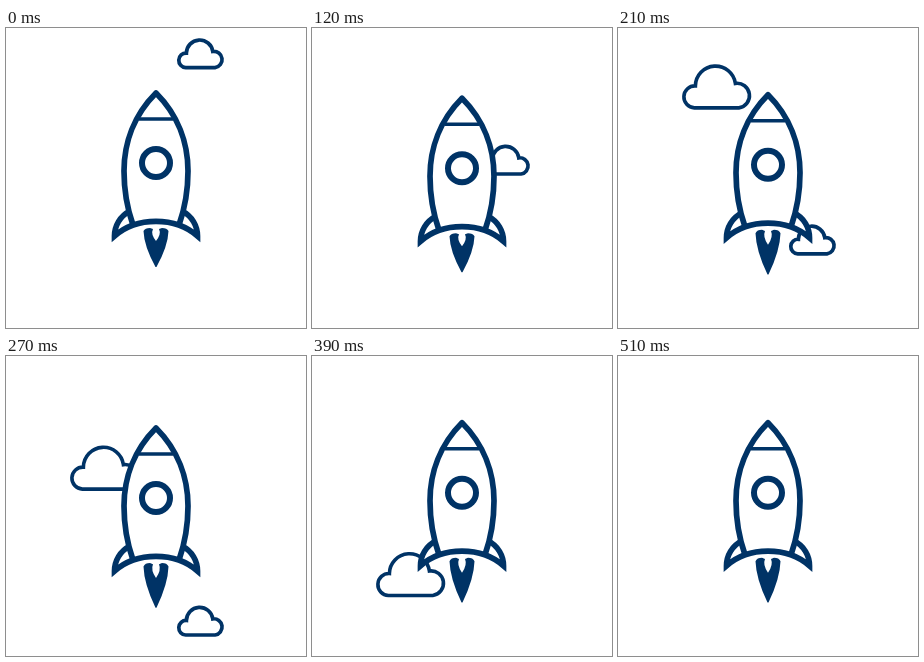
An HTML page that plays this animation: 300x300 px, repeating every 0.54 s.

```html
<!DOCTYPE html>
<html lang="en">
<head>
<meta charset="utf-8">
<title>Rocket</title>
<style>
  html, body { margin: 0; width: 100%; height: 100%; overflow: hidden; background: #fff; }
  svg { display: block; width: 100vw; height: 100vh; }
</style>
</head>
<body>
<svg viewBox="0 0 300 300" fill="#fff" stroke="#036">
  <defs>
    <path id="cloud" d="M10.8 0A10.8 10.8 0 0 1 11.8 -22A20.1 20.1 0 0 1 51.8 -24.500A12.2 12.2 0 0 1 55.2 0Z"/>
    <path id="hull" d="M127 197C121 180 118 163 118 143C118 115 128 87 150 65C172 87 182 115 182 143C182 163 179 180 173 197"/>
  </defs>
  <g id="small"><use href="#cloud" transform="scale(.66)" stroke-width="5.600"/></g>
  <g id="large"><use href="#cloud" stroke-width="3.600"/></g>
  <g id="rocket" stroke-width="5.700">
    <path id="flame" fill="#036" stroke="none" d="M137.500 3Q139 0 144 0L147 1Q144.500 6 150 13Q155.500 6 153 1L156 0Q161 0 162.500 3Q162 18 150.500 39H149.500Q138 18 137.500 3Z"/>
    <use href="#hull" stroke="none"/>
    <path d="M124 183C114 188 108.500 198 108.500 208Q125 193.300 150 193.300T191.500 208C191.500 198 186 188 176 183"/>
    <use href="#hull" fill="none" stroke-linejoin="round"/>
    <path d="M133 91H167" stroke-width="3.600"/>
    <circle cx="150" cy="135" r="14" stroke-width="6"/>
  </g>
</svg>
<script>
  const STEP = 30, STEPS = 18, FALL = 26.6;
  const [small, large, rocket, flame] =
    ['small', 'large', 'rocket', 'flame'].map(id => document.getElementById(id));

  const move = (el, x, y) => el.setAttribute('transform', `translate(${x} ${y})`);

  function drop(el, x, y, step, first, last) {
    el.style.display = step >= first && step <= last ? '' : 'none';
    move(el, x, y + FALL * (step - first));
  }

  function draw(ms) {
    const step = Math.floor(ms / STEP) % STEPS;
    drop(small, 172.6, 39.6, step, 0, 9);
    drop(large, 65.6, 53.3, step, 6, 14);
    move(rocket, 0, 3.5 * (1 - Math.cos(step * Math.PI / 3)));

    // The flame stretches and shrinks every four steps
    const grow = 2 - Math.abs(step % 4 - 2);
    flame.setAttribute('transform', `translate(0 200) scale(1 ${1 + 0.15 * grow})`);
  }

  const start = performance.now();
  function tick() {
    draw(performance.now() - start);
    requestAnimationFrame(tick);
  }
  tick();
</script>
</body>
</html>
```
